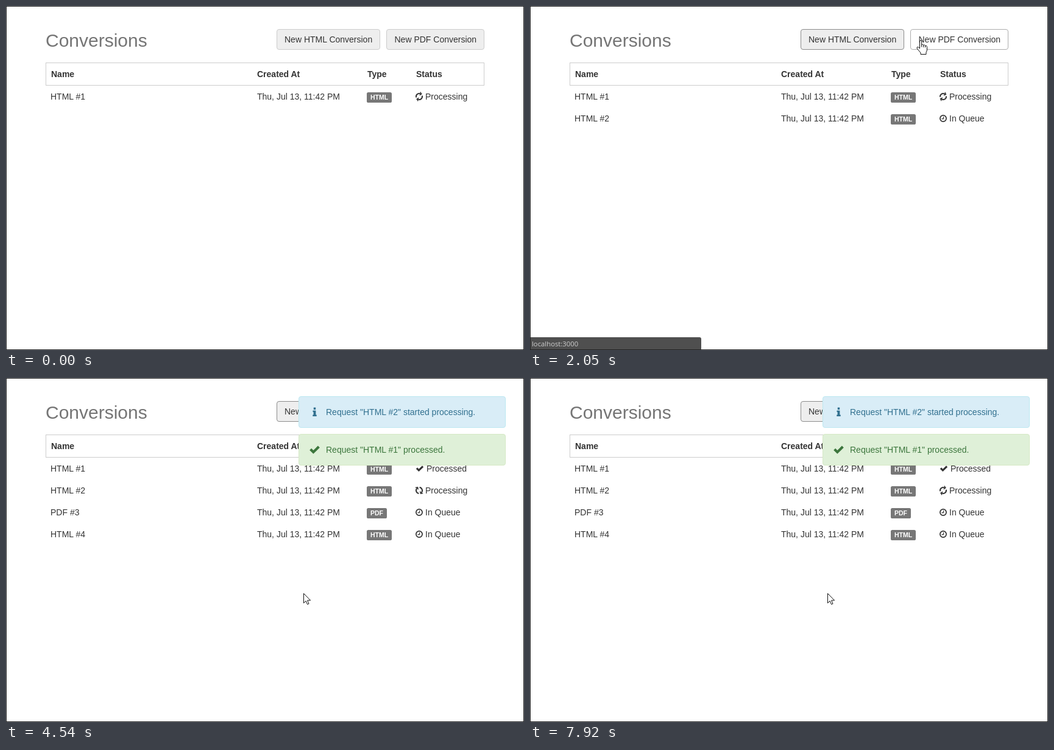
These frames come from a looping animation (850x566 px, 7990 ms). An HTML page:

```html
<!DOCTYPE html>
<html lang="en">
<head>
<meta charset="utf-8">
<title>Conversions</title>
<style>
  html, body { margin: 0; width: 100%; height: 100%; overflow: hidden; background: #fff; }
  svg { display: block; width: 850px; height: 566px; }
  text { font: 14px "Liberation Sans", Arial, sans-serif; fill: #333; }
  .title { font-size: 30px; fill: #757575; }
  .head { font-weight: bold; }
  .badge { font-size: 10.5px; font-weight: bold; fill: #fff; }
  .address { font: 11.3px "Open Sans", "Noto Sans", sans-serif; fill: #cecece; }
  .info text { fill: #31708f; }
  .done text { fill: #3c763d; }
</style>
</head>
<body>
<svg viewBox="0 0 850 566">
  <defs>
    <g id="refresh">
      <g id="arrow">
        <path d="M-4.8 -1.4A5 5 0 0 1 3.7 -3.4" fill="none" stroke="#333" stroke-width="2"/>
        <path d="M6 -5.4V-1H1.6Z" fill="#333" stroke="#333" stroke-width=".4" stroke-linejoin="round"/>
      </g>
      <use href="#arrow" transform="rotate(180)"/>
    </g>
    <g id="clock" fill="none" stroke="#333">
      <circle r="5.1" stroke-width="1.7"/>
      <path d="M.5 -3V.6H-2.5" stroke-width="1.1"/>
    </g>
    <path id="check" d="M-6.2 .6L-4 -1.7L-1.6 .7L4 -4.8L6.2 -2.6L-1.6 5.1Z"/>
    <path id="info" d="M-1.7 -7.4H1.7V-4H-1.7ZM-3 -2.4H1.9V4.6H3.2V7H-3.2V4.6H-1.9V0H-3Z"/>
    <path id="pointer" d="M.5 .5V16.3L4.1 12.8L6.6 18.5L9 17.4L6.6 11.9H11.6Z" fill="#fff" stroke="#111"/>
    <g id="hand" fill="#fff" stroke="#111" stroke-linejoin="round">
      <path d="M-1.5 14V2Q-1.5 .5 0 .5T1.6 2V7.5Q3.5 6.5 4.6 8.2Q6.6 7.4 7.5 9.2Q10.5 8.6 10.5 11.5V16Q10.5 18 9 20V23.5H0V21L-5.8 14Q-6.8 11.8 -5 11.4Q-3.5 11.2 -1.5 14Z"/>
      <path d="M1.6 7.5V11.5M4.6 8.2V12M7.5 9.2V12.3" fill="none"/>
    </g>
  </defs>
  <text class="title" x="65" y="67">Conversions</text>
  <g id="buttons"></g>
  <rect x="65.5" y="93.5" width="719" height="37" fill="#fff" stroke="#ccc"/>
  <g id="heads"></g>
  <g id="rows"></g>
  <g id="status">
    <path d="M1 545H278Q281 545 281 548V566H1Z" fill="#4f4f4f"/>
    <text class="address" x="3" y="560">localhost:3000</text>
  </g>
  <g id="toasts"></g>
  <g id="cursor"><use id="cursorShape"/></g>
  <rect x=".5" y=".5" width="849" height="565" fill="none" stroke="#222"/>
</svg>
<script>
const LOOP = 7990, NEXT_JOB = 3250;
const $ = id => document.getElementById(id);
const clamp = v => Math.max(0, Math.min(1, v));
const ramp = (t, start, length) => clamp((t - start) / length);
const show = (el, on) => el.setAttribute('visibility', on ? 'inherit' : 'hidden');
const label = (x, y, text, cls = '') => `<text class="${cls}" x="${x}" y="${y}">${text}</text>`;

const buttons = [
  { x: 444, width: 170, textX: 457, text: 'New HTML Conversion' },
  { x: 624, width: 161, textX: 637.5, text: 'New PDF Conversion' }
];
const rows = [
  { type: 'HTML', from: 0 },
  { type: 'HTML', from: 1050 },
  { type: 'PDF', from: 2100 },
  { type: 'HTML', from: 2750 }
];
// time, x, y of the cursor's hot spot
const path = [
  [120, 700, 330], [480, 650, 58], [760, 590, 56], [1360, 580, 49],
  [1650, 645, 52], [2150, 640, 56], [2450, 560, 58], [2800, 552, 60],
  [2980, 547, 66], [3380, 500, 225], [3850, 484, 316], [4200, 488, 354]
];

$('buttons').innerHTML = buttons.map(b =>
  `<rect x="${b.x + .5}" y="38.5" width="${b.width - 1}" height="33" rx="3.5"/>` +
  label(b.textX, 60, b.text)).join('');

$('heads').innerHTML = [[74, 'Name'], [412, 'Created At'], [593, 'Type'], [673, 'Status']]
  .map(([x, text]) => label(x, 117, text, 'head')).join('');

const state = (name, icon, textX, text) =>
  `<g class="${name}">${icon}${label(textX, 5, text)}</g>`;

$('rows').innerHTML = rows.map(({ type }, i) => `
  <g transform="translate(0 ${149 + 36 * i})">
    ${label(73, 5, `${type} #${i + 1}`)}
    ${label(412, 5, 'Thu, Jul 13, 11:42 PM')}
    <rect x="592" y="-7" width="${type === 'PDF' ? 33 : 41}" height="17" rx="2.6" fill="#777"/>
    ${label(598, 5, type, 'badge')}
    ${state('queued', '<use href="#clock" x="678"/>', 688, 'In Queue')}
    ${state('processing', '<g transform="translate(678 0)"><use class="spin" href="#refresh"/></g>', 688, 'Processing')}
    ${state('processed', '<use href="#check" x="679" fill="#333"/>', 690, 'Processed')}
  </g>`).join('');

const toast = (cls, y, fill, border, ink, icon, scale, text) => `
  <g class="${cls}">
    <rect x="480.5" y="${y + .5}" width="339" height="51" rx="3.5" fill="${fill}" stroke="${border}"/>
    <use href="#${icon}" transform="translate(506.5 ${y + 26}) scale(${scale})" fill="${ink}"/>
    ${label(525, y + 31, text)}
  </g>`;
$('toasts').innerHTML =
  toast('info', 30, '#d9edf7', '#bce8f1', '#31708f', 'info', 1, 'Request "HTML #2" started processing.') +
  toast('done', 92, '#dff0d8', '#d6e9c6', '#3c763d', 'check', 1.34, 'Request "HTML #1" processed.');

const buttonBoxes = $('buttons').querySelectorAll('rect');
const rowGroups = [...$('rows').children];

function cursorAt(t) {
  const next = path.findIndex(p => p[0] > t);
  if (next < 1) return path[next ? path.length - 1 : 0].slice(1);
  const [t0, x0, y0] = path[next - 1], [t1, x1, y1] = path[next];
  const k = (t - t0) / (t1 - t0), e = k * k * (3 - 2 * k);
  return [x0 + (x1 - x0) * e, y0 + (y1 - y0) * e];
}

function drawCursor(t) {
  const [x, y] = cursorAt(t);
  const visible = t >= path[0][0];
  const focused = t < rows[1].from ? -1 : t >= rows[2].from && t < rows[3].from ? 1 : 0;
  let overButton = false;
  buttons.forEach((b, i) => {
    const hover = visible && x >= b.x && x < b.x + b.width && y >= 38 && y < 72;
    overButton ||= hover;
    buttonBoxes[i].setAttribute('fill', hover ? '#fff' : '#eee');
    buttonBoxes[i].setAttribute('stroke', hover ? '#adadad' : focused === i ? '#8c8c8c' : '#ccc');
  });
  show($('cursor'), visible);
  $('cursor').setAttribute('transform', `translate(${Math.round(x)} ${Math.round(y)})`);
  $('cursorShape').setAttribute('href', overButton ? '#hand' : '#pointer');
}

function drawRows(t) {
  const active = t < NEXT_JOB ? 0 : 1;
  const angle = .18 * t + (active ? -17 : 147);
  rowGroups.forEach((group, i) => {
    show(group, t >= rows[i].from);
    show(group.querySelector('.queued'), i > active && t >= rows[i].from);
    show(group.querySelector('.processing'), i === active && t >= rows[i].from);
    show(group.querySelector('.processed'), i < active);
    group.querySelector('.spin').setAttribute('transform', `rotate(${angle})`);
  });
}

function draw(now) {
  const t = now % LOOP;
  drawCursor(t);
  drawRows(t);
  $('status').setAttribute('opacity', ramp(t, 450, 150) * (1 - ramp(t, 3700, 360)));
  $('toasts').setAttribute('opacity', ramp(t, NEXT_JOB, 800));
}

let start;
function tick(now) {
  start ??= now;
  draw(now - start);
  requestAnimationFrame(tick);
}
draw(0);
requestAnimationFrame(tick);
</script>
</body>
</html>
```
